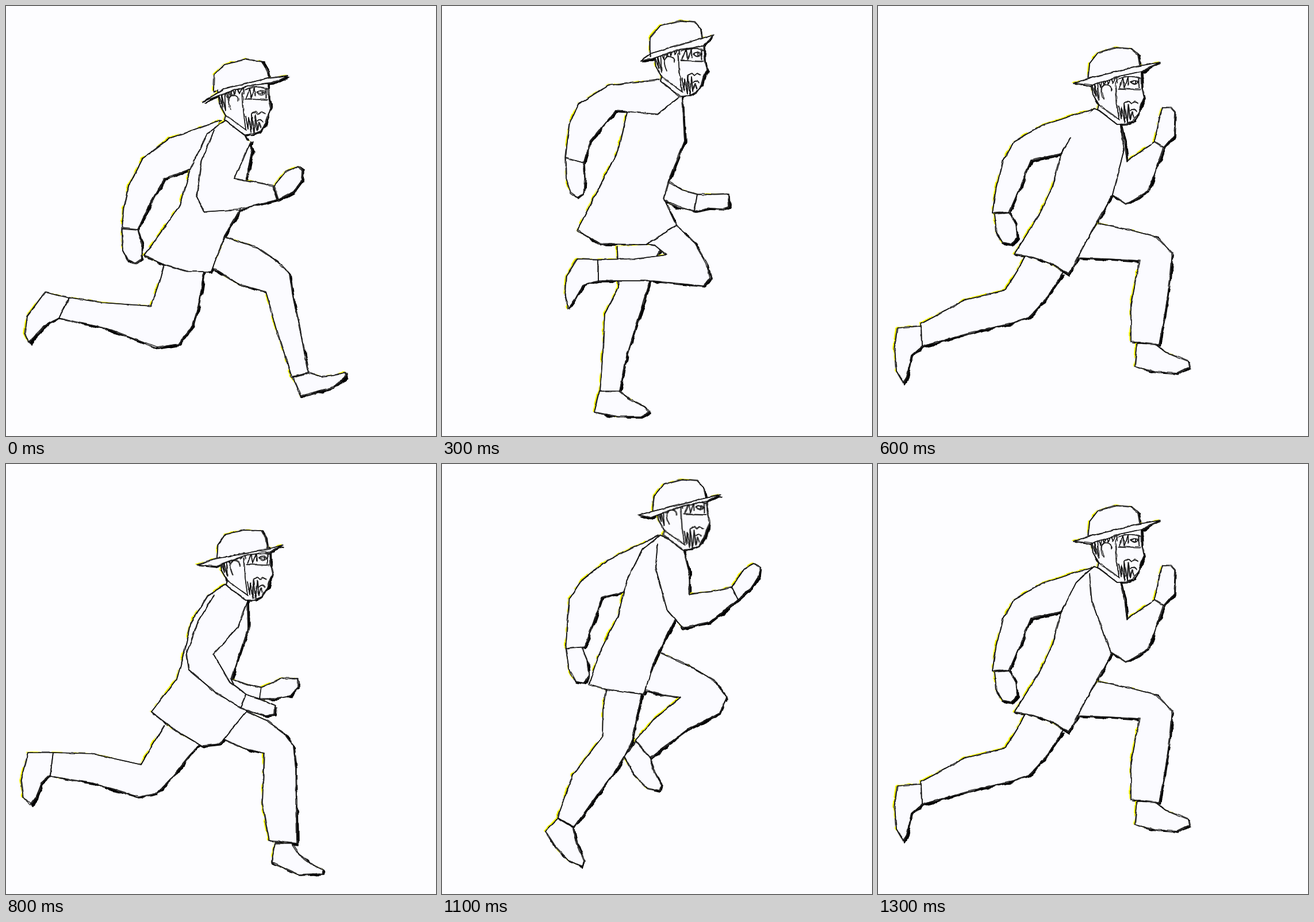
An HTML page without scripts that plays this animation: 748x748 px, repeating every 1.4 s.

```html
<!DOCTYPE html>
<html lang="en">
<head>
<meta charset="utf-8">
<title>Running man</title>
<style>
html, body { margin: 0; width: 100%; height: 100%; overflow: hidden; background: #fdfdff; }
svg { display: block; width: 100%; height: 100%; }
path { fill: #fdfdff; stroke: #3a3a3a; stroke-width: 1.7; stroke-linejoin: round; stroke-linecap: round; }
.pencil path { fill: none; stroke-width: 1.5; }

/* n: near limb, f: far limb, p: single parts; the number is the drawing in the cycle */
.leg {
  --n0: path("M345 455 337 510 325 556 300 588 262 594 175 561 92 543 110 507 168 516 252 522 264 488 274 452M92 543 66 557 50 573 40 585 33 570 37 540 68 498 110 508z");
  --f0: path("M382 402 436 420 470 443 493 465 499 505 513 572 526 638 497 645 474 573 452 497 405 484 360 456M526 638 550 645 591 638 592 644 570 663 540 672 513 679 499 646z");
  --n3: path("M408 382 440 412 460 448 466 472 455 487 365 478 271 478 271 441 335 440 391 433 370 416 330 410M271 478 245 486 232 510 220 526 214 505 216 470 235 440 271 441z");
  --f3: path("M385 415 365 450 360 485 349 520 338 555 322 605 309 670 275 670 280 600 283 535 307 490 305 418M309 670 325 683 352 697 361 706 345 714 305 714 265 706 274 670z");
  --n5: path("M423 338 475 346 505 362 519 380 505 425 485 480 468 556 428 537 440 460 458 402 420 404 398 402M464 558 475 580 497 605 495 618 480 620 445 600 413 572 427 540z");
  --f5: path("M345 425 320 470 293 503 268 526 240 550 195 585 148 627 118 598 168 536 250 480 262 438 286 400M148 627 160 655 171 682 165 690 145 685 118 660 95 625 118 600z");
  --n8: path("M418 430 455 447 485 470 500 490 504 530 505 590 506 660 458 655 446 590 449 503 415 495 378 478M497 660 510 680 535 698 552 706 550 713 510 715 462 693 468 660z");
  --f8: path("M335 488 305 525 285 550 262 573 230 579 150 555 77 543 82 502 150 504 235 523 255 488 275 455M77 541 62 555 52 580 43 592 30 580 26 550 38 502 82 502z");
  --n10: path("M371 417 372 460 373 512 365 545 352 585 340 630 327 688 289 683 300 600 323 518 315 460 304 425M326 690 340 708 364 740 362 747 335 742 305 727 277 711 290 685z");
  --f10: path("M378 360 420 402 452 440 472 472 463 497 380 508 291 537 276 499 320 481 390 453 374 441 355 420M291 537 293 560 294 590 288 597 275 585 258 555 254 510 276 499z");
  --n12: path("M325 425 305 460 290 487 270 512 245 533 190 575 132 616 113 588 155 522 235 471 245 435 268 398M131 616 127 645 130 680 124 692 105 678 90 645 83 607 113 588z");
  --f12: path("M385 338 450 346 495 353 518 378 503 410 475 455 433 525 397 502 415 450 440 399 395 402 345 405M432 524 445 548 470 568 470 581 440 583 410 567 380 548 398 505z");
  --n13: path("M322 465 295 505 278 525 262 542 235 551 155 570 76 592 75 553 150 512 222 494 240 465 256 435M76 592 58 608 50 645 44 655 32 635 29 595 34 560 75 557z");
  --f13: path("M383 378 440 390 485 402 512 430 508 475 500 530 489 589 440 584 440 520 455 443 400 440 342 438M482 588 500 602 540 618 542 628 520 639 480 636 447 627 451 587z");
  --n1: var(--f8); --f1: var(--n8);
}
.arm {
  --n0: path("M362 216 340 270 332 332 345 358 405 354 472 337 464 313 430 306 397 300 412 268 426 236M474 337 500 323 515 303 516 285 508 279 485 290 466 313z");
  --f0: path("M372 199 285 230 238 265 214 312 205 350 202 386 229 389 250 345 275 301 315 287 330 280M202 387 203 425 212 442 225 448 236 440 237 415 229 389z");
  --n3: path("M378 128 290 138 238 170 222 205 218 235 215 264 247 273 258 235 302 182 375 188 411 160M215 264 216 300 224 325 235 333 246 328 248 300 247 273z");
  --f3: path("M370 180 365 240 368 300 385 337 410 349 439 357 444 327 418 320 393 305 405 260 415 200M439 357 465 352 490 353 499 350 498 327 475 328 444 327z");
  --n5: path("M380 150 300 168 245 190 233 225 225 265 220 302 254 302 277 262 300 217 370 208 415 183M220 302 221 335 230 357 243 361 256 355 256 330 254 302z");
  --f5: path("M385 200 385 260 395 322 425 338 462 322 489 247 470 230 452 255 428 270 423 225 420 185M487 246 502 222 502 185 495 172 478 170 471 190 470 230z");
  --n8: path("M362 228 332 278 314 330 318 358 365 398 408 424 418 401 390 380 361 331 403 285 420 240M408 424 430 432 452 438 467 436 468 420 445 410 418 401z");
  --f8: path("M370 240 350 300 360 350 385 385 412 402 441 408 444 389 418 383 392 374 400 330 415 280M441 408 470 408 495 403 508 388 508 374 480 373 444 389z");
  --n10: path("M378 160 371 215 378 280 398 311 450 309 511 291 506 268 460 266 418 262 424 210 415 165M511 291 535 277 555 262 559 250 556 238 538 240 506 268z");
  --f10: path("M375 147 305 195 260 237 241 262 241 315 241 373 268 364 280 320 291 270 312 260 330 230M241 373 250 405 262 422 280 424 287 410 280 380 268 365z");
  --n12: path("M372 158 372 185 405 268 440 299 480 282 518 221 501 201 475 219 443 232 436 200 422 160M518 221 540 195 549 165 548 150 528 148 514 165 501 201z");
  --f12: path("M378 142 270 180 225 210 202 245 195 280 190 309 228 312 245 275 265 235 318 225 335 200M190 309 192 350 203 375 215 378 224 365 224 340 218 312z");
  --n13: path("M368 190 372 240 405 327 432 345 470 322 497 246 481 236 457 253 433 270 429 235 420 197M497 246 515 225 517 185 510 177 495 177 489 195 481 236z");
  --f13: path("M372 180 285 208 237 235 217 270 205 320 199 360 228 359 245 320 266 268 318 257 335 230M203 362 206 395 217 412 232 415 242 403 240 380 229 360z");
  --n1: var(--n8); --f1: var(--f8);
}
.coat {
  --p0: path("M382 199 350 222 322 280 303 345 268 396 240 434 275 450 315 462 357 462 380 400 407 354 428 250 414 222z");
  --p3: path("M382 130 345 140 322 185 306 252 270 322 235 390 275 414 355 415 408 382 386 335 396 300 422 235 418 158z");
  --p5: path("M380 150 345 165 317 215 306 265 298 312 255 375 300 409 350 425 398 406 421 342 396 325 416 220 416 182z");
  --p8: path("M382 210 350 230 322 275 308 335 297 375 253 431 290 460 340 490 372 487 418 430 392 374 421 285 420 236z");
  --p10: path("M380 146 342 172 318 225 309 290 270 362 284 418 305 425 340 421 370 417 371 365 398 312 424 200 418 165z");
  --p12: path("M380 142 355 165 325 220 303 280 280 330 228 388 265 398 300 412 333 425 365 365 408 280 425 220 420 158z");
  --p13: path("M375 178 345 205 318 260 303 315 282 360 237 432 270 437 305 450 332 467 362 410 408 328 428 250 420 195z");
}
.hat {
  --p0: path("M361 148 362 120 380 102 418 93 445 96 455 112 458 126M342 167 380 144 458 125 490 121 462 134 420 139 372 155z");
  --p3: path("M362 88 362 55 380 34 415 26 440 28 450 40 452 55M345 95 362 83 452 56 472 51 455 70 415 75 365 92z");
  --p5: path("M364 100 370 72 385 54 410 48 438 47 446 58 451 72M342 108 370 96 448 77 479 67 460 92 415 92 360 113z");
  --p8: path("M367 163 369 140 382 122 415 115 445 116 452 128 455 146M333 175 365 165 456 148 481 141 458 154 420 158 365 178z");
  --p10: path("M366 103 370 75 388 55 420 50 445 53 458 64 462 80M338 108 368 103 455 82 486 76 462 87 420 93 362 114z");
  --p12: path("M367 100 369 75 385 55 415 44 442 45 452 58 456 77M346 109 368 101 456 78 482 71 460 83 420 92 362 113z");
  --p13: path("M366 125 368 100 382 82 415 72 440 74 453 85 456 103M340 134 375 124 455 104 490 98 458 114 420 122 370 138z");
}

.near, .far, .solo, .head, .bob { animation: near 1.4s step-end infinite; }
.far { animation-name: far; }
.solo { animation-name: solo; }
.head { animation-name: head; }
.bob { animation-name: bob; }

/* steps(2) fills in the drawing halfway to the next key pose */
@keyframes near {
  0%, 100% { d: var(--n0); }
  7.14% { d: var(--n1); animation-timing-function: steps(2); }
  21.42% { d: var(--n3); animation-timing-function: steps(2); }
  35.71% { d: var(--n5); }
  42.85% { d: var(--f13); }
  49.99% { d: var(--f0); }
  57.14% { d: var(--n8); animation-timing-function: steps(2); }
  71.42% { d: var(--n10); animation-timing-function: steps(2); }
  85.71% { d: var(--n12); }
  92.85% { d: var(--n13); }
}
@keyframes far {
  0%, 100% { d: var(--f0); }
  7.14% { d: var(--f1); animation-timing-function: steps(2); }
  21.42% { d: var(--f3); animation-timing-function: steps(2); }
  35.71% { d: var(--f5); }
  42.85% { d: var(--n13); }
  49.99% { d: var(--n0); }
  57.14% { d: var(--f8); animation-timing-function: steps(2); }
  71.42% { d: var(--f10); animation-timing-function: steps(2); }
  85.71% { d: var(--f12); }
  92.85% { d: var(--f13); }
}
@keyframes solo {
  0%, 49.99%, 100% { d: var(--p0); }
  7.14%, 57.14% { d: var(--p8); animation-timing-function: steps(2); }
  21.42% { d: var(--p3); animation-timing-function: steps(2); }
  35.71% { d: var(--p5); }
  71.42% { d: var(--p10); animation-timing-function: steps(2); }
  85.71% { d: var(--p12); }
  42.85%, 92.85% { d: var(--p13); }
}
@keyframes head {
  0%, 49.99%, 100% { transform: translate(0, 0); }
  7.14%, 57.14% { transform: translate(3px, 13px); animation-timing-function: steps(2); }
  21.42% { transform: translate(0, -67px); animation-timing-function: steps(2); }
  35.71% { transform: translate(2px, -47px); }
  71.42% { transform: translate(5px, -51px); animation-timing-function: steps(2); }
  85.71% { transform: translate(4px, -59px); }
  42.85%, 92.85% { transform: translate(2px, -18px); }
}
@keyframes bob {
  0%, 21.42%, 85.71%, 100% { transform: translate(0, 0); }
  14.28% { transform: translate(0, 12px); }
  78.56% { transform: translate(0, -20px); }
}
</style>
</head>
<body>
<svg viewBox="0 0 748 748">
  <defs>
    <filter id="sketch" filterUnits="userSpaceOnUse" x="0" y="0" width="748" height="748" color-interpolation-filters="sRGB">
      <feTurbulence type="fractalNoise" baseFrequency=".05" numOctaves="2" seed="4" result="noise"/>
      <feDisplacementMap in="SourceGraphic" in2="noise" scale="4" xChannelSelector="R" yChannelSelector="G" result="line1"/>
      <feDisplacementMap in="SourceGraphic" in2="noise" scale="5" xChannelSelector="G" yChannelSelector="B" result="line2"/>
      <feBlend in="line1" in2="line2" mode="multiply" result="figure"/>
      <feOffset in="SourceAlpha" dx="2.4" dy="2.4"/>
      <feDisplacementMap in2="noise" scale="9" xChannelSelector="B" yChannelSelector="R" result="shadow"/>
      <feColorMatrix in="noise" values="0 0 0 0 1  0 0 0 0 1  0 0 0 0 0  9 0 0 0 -4" result="patches"/>
      <feOffset in="line1" dx="-1.8" dy="-1.2" result="edge"/>
      <feComposite in="patches" in2="edge" operator="in" result="glow"/>
      <feMerge>
        <feMergeNode in="shadow"/>
        <feMergeNode in="glow"/>
        <feMergeNode in="figure"/>
      </feMerge>
    </filter>
  </defs>
  <g filter="url(#sketch)">
    <g class="bob">
      <g class="leg"><path class="far"/><path class="near"/></g>
      <g class="arm">
        <path class="far"/>
        <path class="coat solo"/>
        <path class="near"/>
      </g>
      <g class="head">
        <path d="M368 146 372 172 382 190 380 198 414 224 430 223 442 218 452 203 456 188 461 177 457 160 456 132 400 130z"/>
        <g class="pencil">
          <path d="M382 190 418 216M391 180Q382 160 393 155 405 155 404 165M411 150 413 185 417 214"/>
          <path d="M369 152 377 175 374 150 382 182 380 147 386 160 387 145 391 155 395 143 398 154 402 141 406 152 412 139 414 152"/>
          <path d="M416 145Q436 137 455 144M416 162 455 163M418 160 424 143 427 160 433 142 434 156M437 150Q445 145 451 151 444 158 437 150M446 149v5M452 144v16"/>
          <path d="M417 192 421 214 422 194 427 220 427 188 432 221 434 190 437 216 440 202 443 211M428 187 435 184 439 188 444 184 450 187M437 200Q443 194 447 201"/>
        </g>
      </g>
      <path class="hat solo"/>
    </g>
  </g>
</svg>
</body>
</html>
```
